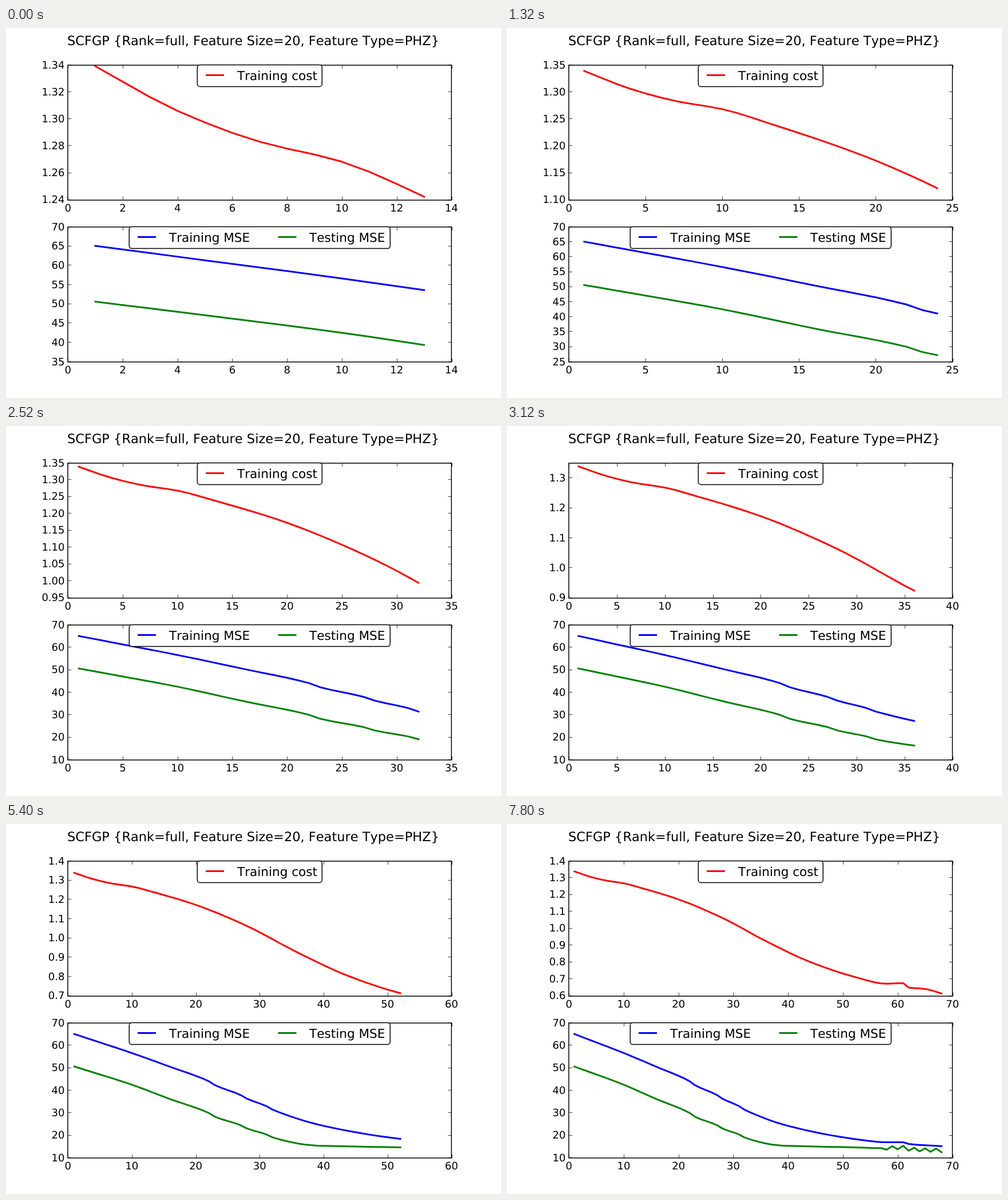
These frames come from a looping animation (865 px wide and 647 px high, 8 s). An HTML page:

```html
<!DOCTYPE html>
<html lang="en">
<head>
<meta charset="utf-8">
<title>SCFGP training curves</title>
<style>
  html, body { margin: 0; width: 100%; height: 100%; overflow: hidden; background: #fff; }
  svg { display: block; }
  text {
    font-family: "DejaVu Sans", Verdana, sans-serif; font-size: 18px; fill: #000;
    font-kerning: none; text-rendering: geometricPrecision;
  }
  .title { font-size: 22.5px; text-anchor: middle; }
  .key { font-size: 21.6px; }
  .x { text-anchor: middle; }
  .y { text-anchor: end; }
  .curve { fill: none; stroke-width: 3; stroke-linecap: square; stroke-linejoin: round; }
  .tick { fill: none; stroke: #000; stroke-width: .75; }
  .frame { fill: none; stroke: #000; stroke-width: 1.5; }
  .legend { fill: #fff; stroke: #000; stroke-width: 1.5; }
</style>
</head>
<body>
<svg width="865" height="647" viewBox="0 0 865 647">
  <defs>
    <clipPath id="clip0"><rect x="108" y="65" width="670.5" height="236"/></clipPath>
    <clipPath id="clip1"><rect x="108" y="348" width="670.5" height="236"/></clipPath>
  </defs>
  <text class="title" x="432" y="30">SCFGP {Rank=full, Feature Size=20, Feature Type=PHZ}</text>
  <g id="plots"></g>
  <rect class="frame" x="108" y="65" width="670.4" height="236"/>
  <rect class="frame" x="108" y="348" width="670.4" height="236"/>

  <rect class="legend" x="334.3" y="64.4" width="218" height="38" rx="4.5"/>
  <path class="curve" stroke="#f00" d="M350.5 82.5H379.5"/>
  <text class="key" x="404" y="90.5">Training cost</text>

  <rect class="legend" x="215.3" y="347.6" width="456" height="38" rx="4.5"/>
  <path class="curve" stroke="#00f" d="M231.5 365.5H260.5"/>
  <text class="key" x="285" y="373.5">Training MSE</text>
  <path class="curve" stroke="#008000" d="M477 365.5H506"/>
  <text class="key" x="530" y="373.5">Testing MSE</text>
</svg>
<script>
const LEFT = 108.125, WIDTH = 670.375, HEIGHT = 235.909;
const TOP_COST = 64.875, TOP_MSE = 347.966;
const LOOP = 8000, COUNT = 68;

// Monotone cubic curve through a few [iteration, value] knots.
function smooth(knots) {
  const slopes = knots.slice(1).map(([x, y], i) => (y - knots[i][1]) / (x - knots[i][0]));
  const tangent = i => {
    const a = slopes[i - 1] ?? slopes[i], b = slopes[i] ?? a;
    return a * b > 0 ? 2 * a * b / (a + b) : 0;
  };
  return x => {
    const i = Math.max(0, knots.findIndex(k => k[0] >= x) - 1);
    const [x0, y0] = knots[i], h = knots[i + 1][0] - x0, d = slopes[i];
    const t = (x - x0) / h, u = 1 - t;
    return y0 + h * (d * t + t * u * ((tangent(i) - d) * u - (tangent(i + 1) - d) * t));
  };
}

const costAt = smooth([
  [1, 1.3392], [4, 1.3061], [7, 1.2832], [10, 1.2684], [13, 1.2425], [20, 1.173],
  [28, 1.0634], [36, .9247], [44, .8025], [52, .7148], [58, .673], [61, .676],
  [62, .65], [65, .642], [68, .615]
]);
const trainAt = smooth([
  [1, 65.1], [4, 62.3], [10, 56.65], [16, 50.5], [22, 44.15], [23, 42.35], [27, 38],
  [28, 36.35], [31, 33.1], [32, 31.5], [40, 24.25], [52, 18.45], [58, 16.95],
  [61, 16.95], [62, 16.2], [68, 15.2]
]);
const gapAt = smooth([
  [1, 14.45], [10, 14.1], [16, 14.35], [22, 14.1], [28, 13.25], [32, 12.35],
  [36, 10.95], [44, 6.8], [52, 3.75], [58, 2.55], [68, 1.9]
]);
// The test error zigzags late in training.
const zigzag = n => n < 58 ? 0 : n % 2 ? .75 : -.75;

const sample = f => Array.from({ length: COUNT }, (_, i) => f(i + 1));
const cost = sample(costAt);
const train = sample(trainAt);
const test = sample(n => trainAt(n) - gapAt(n) + zigzag(n));

// Smallest 1-2-5 step that splits the span into at most nine parts.
function niceStep(span) {
  const raw = span / 9, scale = 10 ** Math.floor(Math.log10(raw));
  return [1, 2, 5, 10].find(m => m * scale >= raw) * scale;
}

// A positive fuzz sends exact ties to the coarser step.
function makeAxis(min, max, fuzz = 0) {
  const fit = niceStep(max - min);
  const lo = Math.floor(min / fit) * fit, hi = Math.ceil(max / fit) * fit;
  const step = niceStep((hi - lo) * (1 + fuzz));
  const digits = step < .09 ? 2 : step < .9 ? 1 : 0;
  const place = v => (v - lo) / (hi - lo);
  const ticks = [];
  const last = Math.floor(hi / step + 1e-6);
  for (let k = Math.ceil(lo / step - 1e-6); k <= last; k++) {
    ticks.push({ at: place(k * step), label: (k * step).toFixed(digits) });
  }
  return { ticks, place };
}

function plot(id, top, n, lines, fuzz) {
  const bottom = top + HEIGHT, right = LEFT + WIDTH;
  const shown = lines.map(([color, data]) => [color, data.slice(0, n)]);
  const all = shown.flatMap(([, data]) => data);
  const xAxis = makeAxis(1, n);
  const yAxis = makeAxis(Math.min(...all), Math.max(...all), fuzz);
  const toX = at => LEFT + WIDTH * at;
  const toY = at => bottom - HEIGHT * at;
  let curves = "", ticks = "", labels = "";

  for (const [color, data] of shown) {
    const points = data.map((v, i) =>
      toX(xAxis.place(i + 1)).toFixed(2) + "," + toY(yAxis.place(v)).toFixed(2));
    curves += `<polyline class="curve" stroke="${color}" points="${points.join(" ")}"/>`;
  }
  for (const { at, label } of xAxis.ticks) {
    const x = toX(at), mark = Math.round(x) + .5;
    ticks += `M${mark} ${top}v6M${mark} ${bottom}v-6`;
    labels += `<text class="x" x="${x}" y="${Math.round(bottom) + 20}">${label}</text>`;
  }
  for (const { at, label } of yAxis.ticks) {
    const y = toY(at), mark = Math.round(y) - .5;
    ticks += `M${LEFT} ${mark}h6M${right} ${mark}h-6`;
    labels += `<text class="y" x="102.5" y="${Math.floor(y + 6.13)}">${label}</text>`;
  }
  return `<g clip-path="url(#clip${id})">${curves}</g><path class="tick" d="${ticks}"/>${labels}`;
}

// Four iterations arrive every 600 ms; one interval is 120 ms shorter.
function countAt(t) {
  if (t < 120) return 13;
  return 16 + 4 * Math.floor((t < 5400 ? t - 120 : t) / 600);
}

const plots = document.getElementById("plots");
let current = 0;

function draw() {
  const n = countAt(performance.now() % LOOP);
  if (n !== current) {
    current = n;
    plots.innerHTML =
      plot(0, TOP_COST, n, [["#f00", cost]], 1e-9) +
      plot(1, TOP_MSE, n, [["#00f", train], ["#008000", test]], 0);
  }
  requestAnimationFrame(draw);
}
draw();
</script>
</body>
</html>
```
